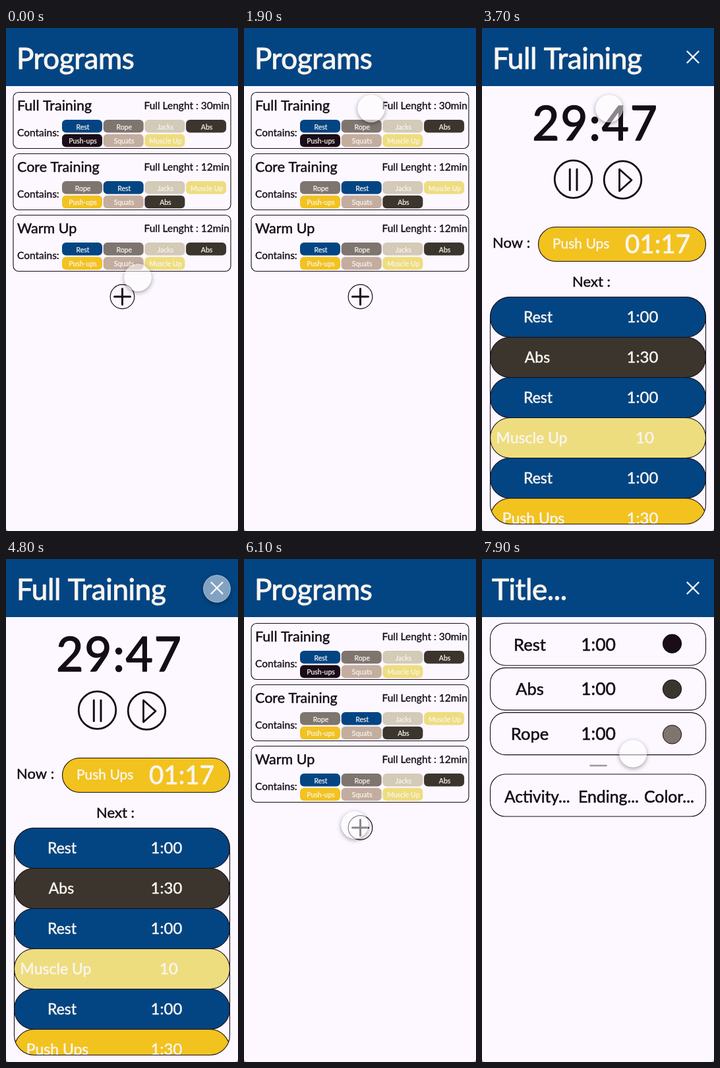
These frames come from a looping animation (352 px wide and 762 px high, 8000 ms). An HTML page with a canvas:

```html
<!DOCTYPE html>
<html lang="en">
<head>
<meta charset="utf-8">
<title>Workout programs</title>
<style>
  html, body { margin: 0; width: 100%; height: 100%; overflow: hidden; background: #fdf8ff; }
  canvas { display: block; width: 352px; height: 762px; }
</style>
</head>
<body>
<canvas id="stage"></canvas>
<script>
const W = 352, H = 762, LOOP = 8000;
const INK = '#150c16', PAPER = '#fdf8ff', CREAM = '#f9f5f0';
const BLUE = '#034583', YELLOW = '#f2c21f';
const COLORS = {
  Rest: BLUE, Rope: '#7e756f', Jacks: '#d3cab7', Abs: '#3b352e',
  Squats: '#c3ad9f', 'Muscle Up': '#eedd7f', 'Push-ups': YELLOW, 'Push Ups': YELLOW
};
const ratio = window.devicePixelRatio || 1;

function prepare(canvas) {
  canvas.width = W * ratio;
  canvas.height = H * ratio;
  const c = canvas.getContext('2d');
  c.scale(ratio, ratio);
  return c;
}

// A thin outline gives the lettering its medium weight
function text(c, str, x, y, size, { color = INK, align = 'left', spacing = 0 } = {}) {
  c.font = `${size}px Lato, sans-serif`;
  c.letterSpacing = spacing + 'px';
  c.textAlign = align;
  c.fillStyle = c.strokeStyle = color;
  c.lineWidth = size * 0.022;
  c.lineJoin = 'round';
  c.fillText(str, x, y);
  c.strokeText(str, x, y);
}

function box(c, x, y, w, h, r, fill, stroke) {
  c.beginPath();
  c.roundRect(x, y, w, h, r);
  paint(c, fill, stroke, 1.1);
}

function disc(c, x, y, r, fill, stroke, width = 1.2) {
  c.beginPath();
  c.arc(x, y, r, 0, Math.PI * 2);
  paint(c, fill, stroke, width);
}

function paint(c, fill, stroke, width) {
  if (fill) { c.fillStyle = fill; c.fill(); }
  if (stroke) { c.strokeStyle = stroke; c.lineWidth = width; c.stroke(); }
}

function path(c, d, color, width) {
  c.lineWidth = width;
  c.strokeStyle = color;
  c.lineCap = c.lineJoin = 'round';
  c.stroke(new Path2D(d));
}

function header(c, title, x, closable) {
  c.fillStyle = PAPER;
  c.fillRect(0, 0, W, H);
  c.fillStyle = BLUE;
  c.fillRect(0, 0, W, 88);
  text(c, title, x, 62, 44, { color: CREAM, spacing: -0.4 });
  if (closable) path(c, 'M311.5 35.5l17 17m0-17l-17 17', '#fff', 2.4);
}

function drawCard(c, y, title, length, chips, pushColor) {
  box(c, 11, y + 0.5, 330, 85, 8, null, INK);
  text(c, title, 17, y + 28, 21.5);
  text(c, `Full Lenght : ${length}min`, 209.5, y + 25.5, 15.5);
  text(c, 'Contains:', 17, y + 67, 15.5);
  chips.forEach((name, i) => {
    const cx = 85 + (i % 4) * 62.7;
    const cy = y + 42 + Math.floor(i / 4) * 21.7;
    const fill = name === 'Push-ups' ? pushColor : COLORS[name];
    box(c, cx, cy, 61, 19.5, 6, fill);
    text(c, name, cx + 31.5, cy + 14.6, 10.5, { color: CREAM, align: 'center' });
  });
}

function drawPrograms(c) {
  header(c, 'Programs', 16);
  const usual = ['Rest', 'Rope', 'Jacks', 'Abs', 'Push-ups', 'Squats', 'Muscle Up'];
  const core = ['Rope', 'Rest', 'Jacks', 'Muscle Up', 'Push-ups', 'Squats', 'Abs'];
  drawCard(c, 97, 'Full Training', 30, usual, '#1a0d17');
  drawCard(c, 190, 'Core Training', 12, core, YELLOW);
  drawCard(c, 283, 'Warm Up', 12, usual, YELLOW);
  disc(c, 176.5, 407, 18.3, null, INK);
  path(c, 'M164.5 407h24m-12-12v24', INK, 3);
}

function drawWorkout(c) {
  header(c, 'Full Training', 16, true);
  text(c, '29:47', 172, 170, 71, { align: 'center', spacing: 1.8 });
  disc(c, 138.5, 229, 28.3, null, INK, 2.8);
  path(c, 'M133.3 214v31.5m10.7-31.5v31.5', INK, 3);
  disc(c, 213.5, 230, 28.3, null, INK, 2.8);
  path(c, 'M208.5 214v33l18.5-16.5z', INK, 2.8);

  text(c, 'Now :', 16, 333, 22);
  box(c, 85.5, 301.5, 254, 52, 26, YELLOW, INK);
  text(c, 'Push Ups', 107, 334, 21, { color: CREAM });
  text(c, '01:17', 266.5, 341, 38.5, { color: CREAM, align: 'center' });
  text(c, 'Next :', 137, 392, 22);

  const rows = [
    ['Rest', '1:00', 85], ['Abs', '1:30', 84], ['Rest', '1:00', 85],
    ['Muscle Up', '10', 75.5], ['Rest', '1:00', 85], ['Push Ups', '1:30', 78]
  ];
  c.save();
  c.beginPath();
  c.roundRect(12.5, 407.5, 327, 344, 30);
  c.clip();
  rows.forEach(([name, amount, x], i) => {
    const y = 407.5 + i * 61;
    box(c, 12.5, y, 327, 61, 30, COLORS[name], INK);
    const style = { color: CREAM, align: 'center' };
    text(c, name, x, y + 38.5, 23, style);
    text(c, amount, amount === '10' ? 247 : 243.5, y + 38.5, 24, style);
  });
  c.restore();
  box(c, 12.5, 407.5, 327, 344, 30, null, INK);
}

function drawEditor(c) {
  header(c, 'Title...', 15, true);
  const rows = [['Rest', '#1a0d17'], ['Abs', COLORS.Abs], ['Rope', COLORS.Rope]];
  rows.forEach(([name, color], i) => {
    const y = 97.2 + i * 67.7;
    box(c, 12.5, y, 327, 64, 23, null, INK);
    text(c, name, 72.5, y + 41.5, 25.5, { align: 'center' });
    text(c, '1:00', 176.5, y + 41.5, 26.5, { align: 'center' });
    disc(c, 288.5, 128.3 + i * 68.8, 14.2, color, INK, 1);
  });
  path(c, 'M164.5 313h24', '#9d989f', 2.6);
  box(c, 12.5, 326, 327, 64, 23, null, INK);
  text(c, 'Activity...', 34, 369, 24.5);
  text(c, 'Ending...', 146, 369, 24.8);
  text(c, 'Color...', 246, 369, 24.8);
}

function makeScreen(draw) {
  const canvas = document.createElement('canvas');
  draw(prepare(canvas));
  return canvas;
}

const ctx = prepare(document.getElementById('stage'));
const programs = makeScreen(drawPrograms);
const workout = makeScreen(drawWorkout);
const editor = makeScreen(drawEditor);

const progress = (t, from, to) => Math.min(1, Math.max(0, (t - from) / (to - from)));
const easeInOut = p => p * p * (3 - 2 * p);
const easeOut = p => 1 - (1 - p) ** 1.75;

// Pointer moves: start, end, destination
const START = [200, 378];
const MOVES = [
  [1050, 1750, 193, 122],
  [4050, 4750, 320, 45],
  [5300, 5950, 168, 403],
  [6750, 7450, 182, 318],
  [7600, 8250, 288, 266]
];

function pointerAt(t) {
  let [x, y] = START;
  for (const [from, to, tx, ty] of MOVES) {
    const p = easeInOut(progress(t, from, to));
    x += (tx - x) * p;
    y += (ty - y) * p;
  }
  return [x, y];
}

function drawPointer([x, y]) {
  ctx.save();
  ctx.beginPath();
  ctx.rect(0, 0, W, H);
  ctx.arc(x, y, 20.5, 0, Math.PI * 2);
  ctx.clip('evenodd');
  ctx.shadowColor = 'rgba(0,0,0,.4)';
  ctx.shadowBlur = 7 * ratio;
  ctx.shadowOffsetY = 2 * ratio;
  disc(ctx, x, y, 20.5, '#fff');
  ctx.restore();
  disc(ctx, x, y, 20.5, 'rgba(255,255,255,.5)', 'rgba(255,255,255,.35)', 1);
}

// Each push carries the old screen out while the next one follows it in
const PUSHES = [
  { start: 1920, from: programs, to: workout, dx: -1, dy: 0 },
  { start: 4850, from: workout, to: programs, dx: 1, dy: 0 },
  { start: 6146, from: programs, to: editor, dx: 0, dy: -1 }
];
const PUSH_TIME = 300;

function drawScreens(t) {
  const push = PUSHES.findLast(p => t >= p.start) || PUSHES[0];
  const { start, from, to, dx, dy } = push;
  const p = easeOut(progress(t, start, start + PUSH_TIME));
  const x = Math.round(dx * W * p), y = Math.round(dy * H * p);
  ctx.drawImage(from, x, y, W, H);
  ctx.drawImage(to, x - dx * W, y - dy * H, W, H);
}

function drawCorners() {
  ctx.fillStyle = '#aaa6ab';
  ctx.fill(new Path2D('M0 757q0 5 5 5H0zM352 757q0 5-5 5h5z'));
}

function render(t) {
  drawScreens(t);
  drawCorners();
  drawPointer(pointerAt(t));
}

function tick() {
  render(performance.now() % LOOP);
  requestAnimationFrame(tick);
}
tick();
</script>
</body>
</html>
```
